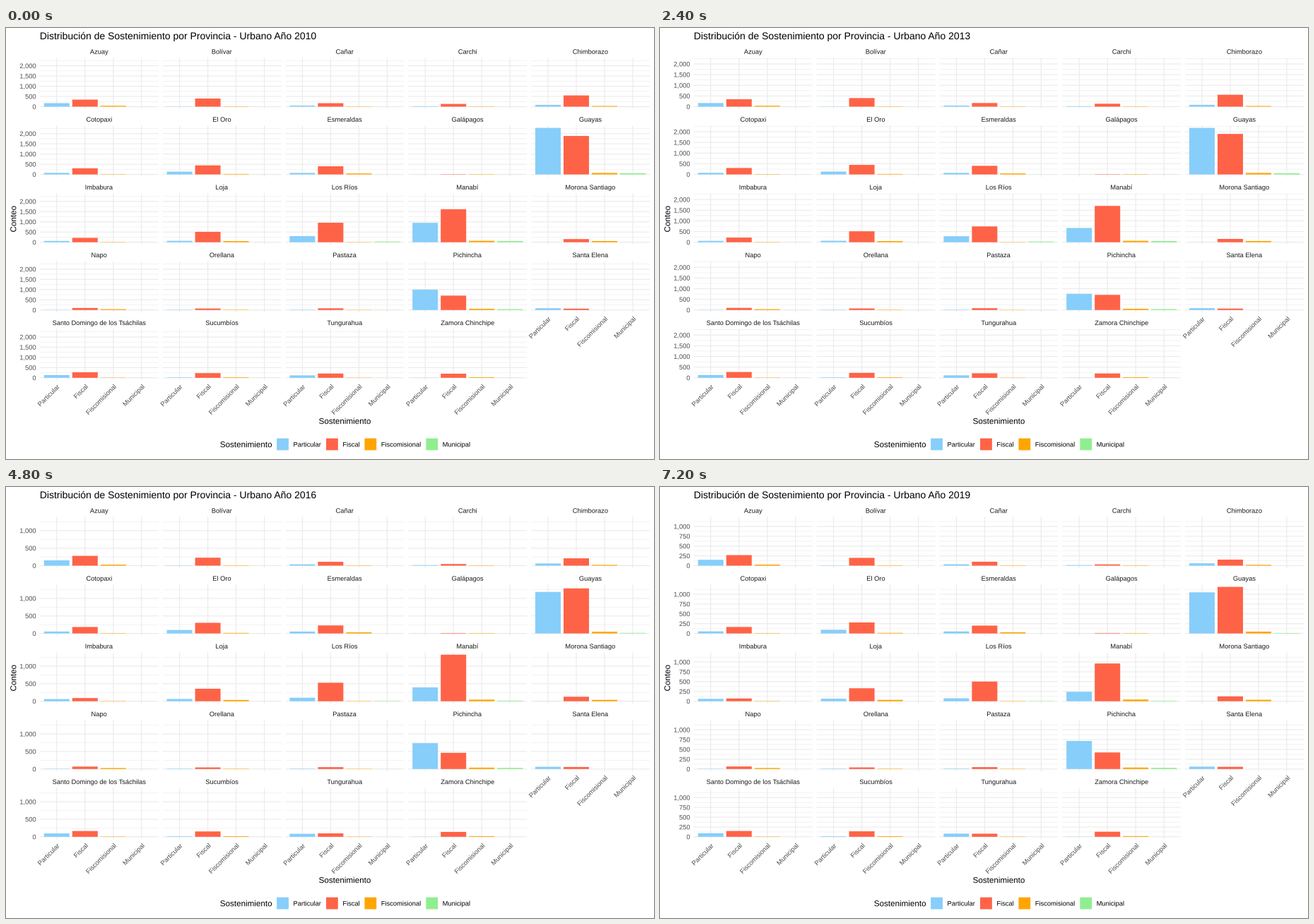
These frames come from a looping animation (917x611 px, 8 s). A matplotlib script:

```python
import numpy as np
import matplotlib as mpl
import matplotlib.pyplot as plt
from matplotlib.animation import FuncAnimation
from matplotlib.collections import LineCollection
from matplotlib.patches import PathPatch, Rectangle
from matplotlib.textpath import TextPath
from matplotlib.transforms import Affine2D

W, H, DPI = 917, 611, 128
PT = 72 / DPI                      # one pixel in points
YEARS = range(2010, 2020)

mpl.rcParams["font.family"] = "Liberation Sans"

SECTORS = ["Particular", "Fiscal", "Fiscomisional", "Municipal"]
COLORS = ["#87CEFA", "#FF6347", "#FFA500", "#90EE90"]

# First count of Particular and Fiscal, and the share of Fiscal left at the end
PROVINCES = {
    "Azuay": (172, 345, 0.78),
    "Bolívar": (10, 398, 0.50),
    "Cañar": (52, 170, 0.59),
    "Carchi": (22, 135, 0.24),
    "Chimborazo": (88, 550, 0.28),
    "Cotopaxi": (78, 300, 0.55),
    "El Oro": (138, 445, 0.63),
    "Esmeraldas": (75, 400, 0.50),
    "Galápagos": (3, 14, 0.85),
    "Guayas": (2280, 1885, 0.63),
    "Imbabura": (65, 215, 0.33),
    "Loja": (70, 510, 0.65),
    "Los Ríos": (300, 955, 0.53),
    "Manabí": (950, 1615, 0.60),
    "Morona Santiago": (5, 155, 0.80),
    "Napo": (10, 100, 0.65),
    "Orellana": (15, 75, 0.55),
    "Pastaza": (16, 85, 0.57),
    "Pichincha": (1000, 705, 0.60),
    "Santa Elena": (90, 68, 0.83),
    "Santo Domingo de los Tsáchilas": (135, 270, 0.55),
    "Sucumbíos": (20, 230, 0.61),
    "Tungurahua": (120, 210, 0.38),
    "Zamora Chinchipe": (6, 203, 0.64),
}

# Larger counts of the two small sectors; the others are a seeded trickle
FISCOMISIONAL = {
    "Azuay": 44, "Chimborazo": 34, "El Oro": 24, "Esmeraldas": 48,
    "Guayas": 74, "Loja": 56, "Manabí": 70, "Morona Santiago": 60,
    "Napo": 42, "Pichincha": 60, "Sucumbíos": 26, "Zamora Chinchipe": 30,
    "Santa Elena": 0,
}
MUNICIPAL = {"Guayas": 58, "Los Ríos": 34, "Manabí": 60, "Pichincha": 44,
             "Santa Elena": 0}

PARTICULAR_LEFT = {"Azuay": 0.87, "Guayas": 0.46, "Imbabura": 0.95,
                   "Loja": 0.92, "Los Ríos": 0.25}

# How far a count has gone from its first to its last value
FALL_YEARS = [2010, 2012, 2013, 2014, 2015, 2016, 2017, 2019]
FALL = [0, 0.06, 0.08, 0.16, 0.17, 0.89, 0.99, 1]
FISCAL_FALL = [0, -0.08, -0.02, 0.2, 0.25, 0.86, 0.99, 1]

# Series with a course of their own
KEYED = {
    ("Manabí", "Particular"): {2010: 950, 2012: 768, 2013: 668, 2014: 437,
                               2016: 395, 2017: 266, 2019: 240},
    ("Manabí", "Fiscal"): {2010: 1615, 2012: 1740, 2014: 1665, 2016: 1328,
                           2017: 1090, 2019: 963},
    ("Los Ríos", "Fiscal"): {2010: 955, 2012: 770, 2014: 712, 2016: 528,
                             2019: 502},
    ("Pichincha", "Particular"): {2010: 1000, 2012: 993, 2013: 760,
                                  2019: 715},
}

# Panel layout in pixels
LEFT, PITCH_X, PANEL_W = 47.8, 173.8, 168.0
ZERO, PITCH_Y = 111.5, 96.1
FULL = 66.0                        # height of the tallest bar
PAD = 0.05 * FULL
UNIT = PANEL_W / 4.2               # width of one category
COLS = 5

TITLE, BODY, SMALL = 13.97, 11.64, 9.31


def course(first, left, fall=FALL):
    """Counts over all years, from first down to the share that is left."""
    return first * (1 - (1 - left) * np.interp(YEARS, FALL_YEARS, fall))


def build_counts():
    """Counts by province, sector and year."""
    rng = np.random.default_rng(4)
    table = []
    for name, (particular, fiscal, left) in PROVINCES.items():
        small = rng.uniform(10, 15), rng.uniform(2, 6)
        rows = [
            course(particular, PARTICULAR_LEFT.get(name, 0.68)),
            course(fiscal, left, FISCAL_FALL),
            course(FISCOMISIONAL.get(name, small[0]), 0.62),
            course(MUNICIPAL.get(name, small[1]),
                   0.7 if name == "Pichincha" else 0.2),
        ]
        for k, sector in enumerate(SECTORS):
            keys = KEYED.get((name, sector))
            if keys:
                rows[k] = np.interp(YEARS, list(keys), list(keys.values()))
        table.append(rows)
    return np.array(table)


COUNTS = build_counts()


def panel(i):
    """Left edge and zero line of panel i."""
    return LEFT + i % COLS * PITCH_X, ZERO + i // COLS * PITCH_Y


def center(x0, k):
    return x0 + (0.6 + k) * UNIT


fig = plt.figure(figsize=(W / DPI, H / DPI), dpi=DPI, facecolor="white")
ax = fig.add_axes([0, 0, 1, 1])
ax.set_xlim(0, W)
ax.set_ylim(H, 0)
ax.axis("off")


def outline(x, y, s, size, ha="left", rotation=0):
    """Text as a path, its baseline anchored at x, y."""
    path = TextPath((0, 0), s, size=size)
    ink = path.get_extents()
    shift = {"left": 0, "center": (ink.x0 + ink.x1) / 2,
             "right": ink.x1 + 0.04 * size}[ha]
    place = (Affine2D().translate(-shift, 0).rotate_deg(rotation)
             .scale(1, -1).translate(x, y))
    return place.transform_path(path)


def label(x, y, s, size, color="black", ha="left", rotation=0):
    return ax.add_patch(PathPatch(outline(x, y, s, size, ha, rotation),
                                  fc=color, lw=0, snap=False, zorder=4))


def box(x, y, w, h, color):
    return ax.add_patch(Rectangle((x, y), w, h, fc=color, lw=0,
                                  snap=False, zorder=3))


def grid(width, zorder):
    lines = LineCollection([], colors="#EBEBEB", linewidths=width * PT,
                           capstyle="butt", zorder=zorder)
    lines.set_snap(False)
    return ax.add_collection(lines, autolim=False)


def category_labels(x0, zero):
    # each name hangs by its top right corner
    drop = 0.716 * SMALL * np.sqrt(0.5)
    for k, name in enumerate(SECTORS):
        label(center(x0, k) + drop, zero + PAD + 5.2 + drop, name, SMALL,
              "#4D4D4D", "right", 45)


def legend():
    x, y = 302.8, 590.1
    label(x, y + 4.2, "Sostenimiento", BODY)
    x += 79.6
    for name, color, width in zip(SECTORS, COLORS, (40, 24.5, 57, 40)):
        box(x + 0.75, y - 8.4, 16.8, 16.8, color)
        label(x + 24.1, y + 3.4, name, SMALL)
        x += 24.1 + width + 5.8


minor_grid, major_grid = grid(0.57, 1), grid(1.13, 2)
title = label(LEFT, 16, "0", TITLE)
label(14.3, ZERO + 159.2, "Conteo", BODY, ha="center", rotation=90)
label(479.5, 561.2, "Sostenimiento", BODY, ha="center")
legend()

bars, verticals = [], []
for i, province in enumerate(PROVINCES):
    x0, zero = panel(i)
    label(x0 + PANEL_W / 2, zero - 74.8, province, SMALL, "#1A1A1A", "center")
    for k, color in enumerate(COLORS):
        cx = center(x0, k)
        verticals.append([(cx, zero - FULL - PAD), (cx, zero + PAD)])
        bars.append(box(cx - 0.45 * UNIT, zero, 0.9 * UNIT, 0, color))
    if i + COLS >= len(PROVINCES):
        category_labels(x0, zero)

ticks = [[label(42.6, 0, "0", SMALL, "#4D4D4D") for _ in range(5)]
         for _ in range(5)]


def horizontals(levels, scale):
    segments = []
    for i in range(len(PROVINCES)):
        x0, zero = panel(i)
        for v in levels:
            y = zero - v * scale
            segments.append([(x0, y), (x0 + PANEL_W, y)])
    return segments


def update(frame):
    counts = COUNTS[:, :, frame].ravel()
    top = counts.max()
    scale = FULL / top
    step = 500 if top > 1300 else 250

    major = np.arange(0, top * 1.05, step)
    minor = np.arange(step / 2, top * 1.05, step)
    minor_grid.set_segments(horizontals(minor, scale))
    major_grid.set_segments(horizontals(major, scale) + verticals)

    for j, (bar, n) in enumerate(zip(bars, counts)):
        zero = panel(j // 4)[1]
        bar.set_y(zero - n * scale)
        bar.set_height(n * scale)

    for row, marks in enumerate(ticks):
        zero = ZERO + row * PITCH_Y
        for k, mark in enumerate(marks):
            mark.set_visible(k < len(major))
            if k < len(major):
                y = zero - major[k] * scale + 3.35
                mark.set_path(outline(42.6, y, f"{int(major[k]):,}",
                                      SMALL, "right"))

    title.set_path(outline(LEFT, 16, "Distribución de Sostenimiento por "
                           f"Provincia - Urbano Año {YEARS[frame]}", TITLE))
    return [title, minor_grid, major_grid, *bars]


anim = FuncAnimation(fig, update, frames=len(YEARS), interval=800,
                     repeat=True, repeat_delay=0, blit=False)
plt.show()
```
